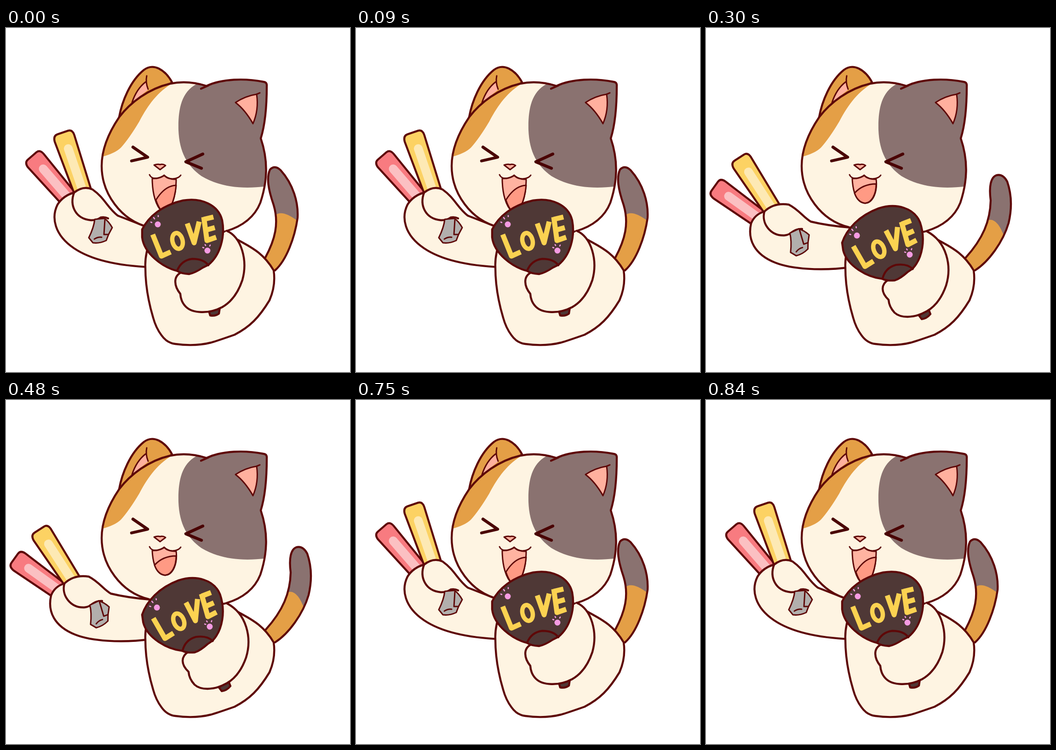
Animation, 748 px wide and 748 px high, one loop 0.9 s. Source, as an HTML page:

```html
<!DOCTYPE html>
<html lang="en">
<head>
<meta charset="utf-8">
<title>Cheering cat</title>
<style>
  html, body { margin: 0; width: 100%; height: 100%; overflow: hidden; background: #fff; }
  svg { display: block; width: 100vw; height: 100vh; }
  .ink { stroke: #5e0808; stroke-width: 4.4; }
  .thin { stroke-width: 3; }
  .cream { fill: #fef4e2; }
  .orange { fill: #e49f46; }
  .grey { fill: #8a7270; }
  .pose { opacity: 0; animation: 900ms step-end infinite; }
  .high { animation-name: high; }
  .mid { animation-name: mid; }
  .low { animation-name: low; }
  @keyframes high { 0% { opacity: 1 } 16.6667% { opacity: 0 } 83.3333% { opacity: 1 } }
  @keyframes mid {
    0% { opacity: 0 } 16.6667% { opacity: 1 } 33.3333% { opacity: 0 }
    66.6667% { opacity: 1 } 83.3333% { opacity: 0 }
  }
  @keyframes low { 0% { opacity: 0 } 33.3333% { opacity: 1 } 66.6667% { opacity: 0 } }
</style>
</head>
<body>
<svg viewBox="0 0 748 748" fill="none" stroke-linecap="round" stroke-linejoin="round">
  <defs>
    <path id="skull" d="M246 194C270 162 310 132 357 121Q395 113 436 126C470 110 520 109 560 117Q568 118 567 126C567 165 565 205 554 240C571 290 568 335 553 380Q535 425 478 442C430 455 360 450 310 433C250 418 208 360 208 300C208 262 225 225 246 194Z"/>
    <clipPath id="skullClip"><use href="#skull"/></clipPath>

    <g id="head">
      <path class="ink orange" d="M246 194C252 160 270 115 300 91Q315 80 332 88Q350 97 361 118L300 170Z"/>
      <path fill="#ffb09e" d="M274 162Q284 132 304 118Q305 128 309 134Z"/>
      <path class="ink thin" d="M274 162Q284 132 304 117M306 104Q303 118 309 133"/>
      <use href="#skull" class="cream"/>
      <g clip-path="url(#skullClip)">
        <path class="orange" d="M362 120C325 142 305 175 290 203Q268 240 250 260Q237 273 205 281V100Z"/>
        <path class="grey" d="M414 122C380 140 374 180 375 222C377 270 394 300 425 322C465 346 515 352 575 343V100H430Z"/>
      </g>
      <use href="#skull" class="ink"/>
      <path class="ink" d="M424 132L440 125"/>
      <path class="ink thin" fill="#ffb09e" d="M499 162Q520 148 545 144Q550 178 537 208Q520 178 499 162Z"/>
      <path class="ink thin" d="M545 144L552 141"/>
      <path stroke="#4a0404" stroke-width="6.4" d="M276 259L308 281L273 289M428 274L391 291L425 305"/>
      <path class="ink thin" fill="#ffb09e" d="M322 298Q330 295 335 297Q341 295 347 299L335 308Z"/>
    </g>

    <path id="lip" class="ink thin" d="M312 319Q316 328 328 327Q338 325 344 320Q350 328 362 328Q376 327 380 320"/>

    <path id="body" class="ink cream" d="M303 520C302 500 306 480 320 440L478 441C505 470 549 471 582 527Q587 560 573 592C550 630 530 650 497 667Q460 680 446 684Q410 693 368 687Q350 685 338 668Q326 652 320 630C308 590 303 555 303 520Z"/>

    <g id="stick">
      <path class="ink" d="M-19 140L-23 8Q-22 -5 -12 -5H12Q22 -5 22 8L18 140Z"/>
      <path stroke="#fff" stroke-opacity=".52" stroke-width="19" d="M0 32V130"/>
    </g>

    <g id="clasp">
      <path class="ink thin" fill="#b2afad" d="M193 416L214 414Q223 420 231 434L223 449L218 462Q203 469 189 467L180 456Q191 434 193 416Z"/>
      <path class="ink thin" d="M215 417L213 449L223 449M192 459Q200 454 208 455"/>
    </g>

    <g id="fan" aria-label="LOVE">
      <path class="ink" fill="#4f3836" d="M296 438C310 410 340 385 385 375C425 368 462 385 470 418C477 455 465 495 440 515L428 521Q410 533 398 535Q380 534 372 528C340 520 300 490 296 455Z"/>
      <path class="ink" d="M372 528Q381 505 405 502Q430 502 440 516"/>
      <g stroke="#fbd251" stroke-width="11" stroke-linecap="butt">
        <path d="M319 449L338 496L358 487M394 425L409 467L420 421M430 411L437 462L457 455M430 416L451 411M433 440L454 434"/>
        <ellipse cx="373" cy="463" rx="11" ry="17.5" stroke-width="9.5" transform="rotate(-14 373 463)"/>
      </g>
      <g fill="#f59be2">
        <circle cx="330" cy="427" r="6.5"/>
        <circle cx="438" cy="484" r="6.5"/>
      </g>
      <path stroke="#f59be2" stroke-width="2.6" d="M315 422L317 423M321 412L323 415M331 408L331 410M428 477L430 478M433 471L434 473M444 472L443 474"/>
    </g>
  </defs>
</svg>

<script>
const poses = {
  high: {
    tail: "M550 515L564 499C585 460 594 425 582 385C570 350 566 325 574 308Q584 297 597 309C625 340 636 380 634 413C628 455 610 505 585 527",
    tip: "M585 408Q600 392 640 424V540H540V480Z",
    sticks: [[60, 282, -40.8], [125, 232, -18.9]],
    arm: "M315 520C240 517 185 504 148 479C105 450 98 412 112 384Q125 364 148 358Q168 342 188 351C215 370 220 390 243 408L315 436",
    thumb: "M148 358C138 385 150 415 185 418Q198 418 206 412Q214 410 222 414",
    clasp: "",
    mouth: "M318 327C318 360 326 388 340 400H352C365 380 370 355 370 329Q356 330 344 321Q332 328 318 327Z",
    tongue: "M326 374Q345 343 370 342C368 365 362 384 352 400H340Q331 390 326 374Z",
    grip: "M441 615L444 625Q455 627 463 621L465 608Z",
    paw: "M480 441C512 455 526 505 514 548Q500 590 470 607C440 623 405 620 391 606Q380 595 379 578C366 562 362 540 382 531",
    fan: ""
  },
  mid: {
    tail: "M550 515L565 499C598 460 611 420 601 375C592 340 593 318 602 310Q616 302 626 316C645 345 650 380 647 410C641 455 615 508 585 527",
    tip: "M598 411Q618 398 644 440L660 540H540V490Z",
    sticks: [[47, 309, -47.2], [106, 255, -26.6]],
    arm: "M315 519C245 518 190 508 153 488C106 462 98 432 114 402Q126 384 144 376Q166 357 190 365C212 378 222 398 238 411L315 436",
    thumb: "M144 374C136 402 150 428 178 432Q190 432 198 426Q210 421 221 426",
    clasp: "translate(3 11) rotate(-8 203 440)",
    mouth: "M318 327C318 360 328 392 346 393C362 392 372 365 370 329Q356 330 344 321Q332 328 318 327Z",
    tongue: "M324 367Q343 341 370 341C369 370 360 392 346 393Q332 390 324 367Z",
    grip: "M451 622L457 630Q468 630 476 622L472 612Z",
    paw: "M480 442C518 462 530 515 517 558Q503 596 475 613C446 631 412 627 400 614Q388 602 387 587C372 570 371 550 388 541",
    fan: "translate(-1 10) rotate(-4 384 455)"
  },
  low: {
    tail: "M550 515L565 499C602 458 618 420 619 375C615 345 619 324 632 320Q646 317 655 334C664 360 666 390 658 424C646 465 615 508 585 527",
    tip: "M610 419Q632 408 649 455L670 540H540V490Z",
    sticks: [[23, 347, -54.3], [75, 286, -32.8]],
    arm: "M315 520C250 529 185 524 150 510C105 492 90 460 98 425Q106 405 127 399Q148 379 180 384C203 396 212 412 228 421Q265 430 315 434",
    thumb: "M127 399C120 425 140 452 170 451Q181 450 188 443Q198 436 209 437",
    clasp: "translate(-3 25) rotate(-20 203 440)",
    mouth: "M318 327C319 355 327 380 346 381C364 380 373 355 370 329Q356 330 344 321Q332 328 318 327Z",
    tongue: "M323 359Q341 339 370 339C370 362 360 380 346 381Q330 379 323 359Z",
    grip: "M463 625L469 633Q480 632 488 622L484 612Z",
    paw: "M480 442C524 465 535 518 522 560Q508 600 480 616C450 633 422 630 410 619Q398 606 397 591C380 575 380 558 396 548",
    fan: "translate(1.5 16.5) rotate(-8 384 455)"
  }
};

const path = (d, cls, fill = "") => `<path class="${cls}" d="${d}"${fill && ` fill="${fill}"`}/>`;
const use = (id, transform = "", fill = "none") =>
  `<use href="#${id}" transform="${transform}" fill="${fill}"/>`;
const stick = ([x, y, turn], fill) => use("stick", `translate(${x} ${y}) rotate(${turn})`, fill);

const drawPose = ([name, p]) => `
  <g class="pose ${name}">
    <clipPath id="tail-${name}"><path d="${p.tail}"/></clipPath>
    ${path(p.tail, "grey")}
    <g clip-path="url(#tail-${name})">${path(p.tip, "orange")}</g>
    ${path(p.tail, "ink")}
    ${stick(p.sticks[0], "#f87b80")}
    ${stick(p.sticks[1], "#fcd263")}
    ${path(p.arm, "ink cream")}
    ${path(p.thumb, "ink")}
    ${use("clasp", p.clasp)}
    ${use("body")}
    ${use("head")}
    ${path(p.mouth, "ink thin", "#ffb3a1")}
    ${path(p.tongue, "ink thin", "#ff9a84")}
    ${use("lip")}
    ${path(p.grip, "ink", "#4f3836")}
    ${path(p.paw, "ink cream")}
    ${use("fan", p.fan)}
  </g>`;

document.querySelector("svg").insertAdjacentHTML("beforeend", Object.entries(poses).map(drawPose).join(""));
</script>
</body>
</html>
```
